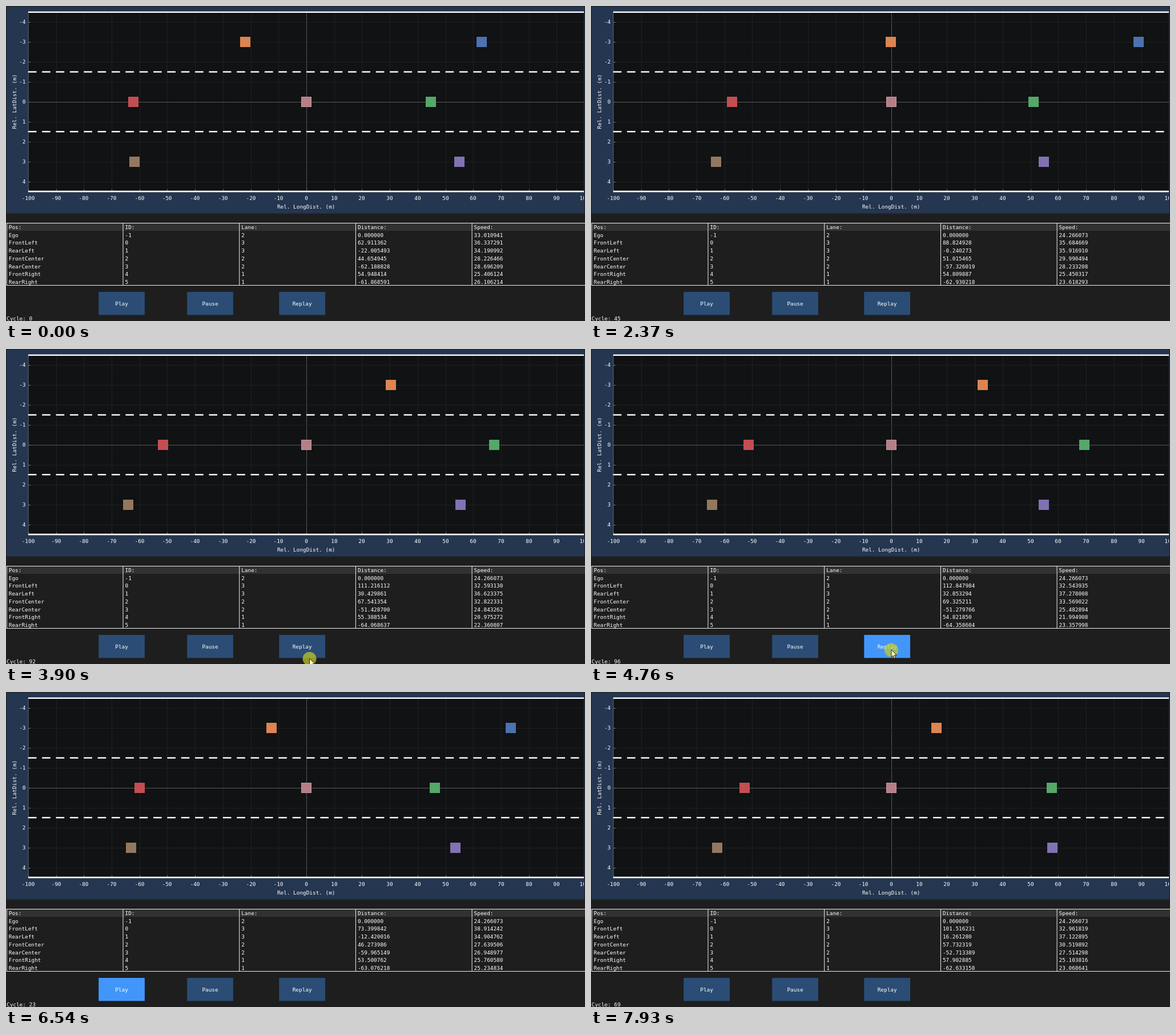
Write an HTML page with a canvas that moves like this. It is 1014 px wide and 552 px high and loops after 8 s.

```html
<!DOCTYPE html>
<html lang="en">
<head>
<meta charset="utf-8">
<title>Lane traffic view</title>
<style>
html, body { margin: 0; width: 100%; height: 100%; overflow: hidden; background: #1e1e1e; }
canvas { display: block; }
</style>
</head>
<body>
<canvas id="stage" width="1014" height="552"></canvas>
<script>
const g = document.getElementById('stage').getContext('2d');
const LOOP = 8000, FRAME = 66.1, DT = 0.05;
const X0 = 526, Y0 = 168, SX = 4.872, SY = 34.9;
const LEFT = 39, TOP = 10, RIGHT = 1012, BOTTOM = 326;
const COLUMN = 203.7, ROW = 13.72;

// Distances at a few cycles; everything between is a smooth curve
const KNOTS = [0, 19, 45, 71, 96];
const CARS = [
  ['FrontLeft', 3, '#4c72b0', [62.911362, 70.734703, 88.824928, 102.461967, 112.847984]],
  ['RearLeft', 3, '#dd8452', [-22.005493, -14.5777, -0.240273, 17.579369, 32.853294]],
  ['FrontCenter', 2, '#55a868', [44.654945, 45.464451, 51.015465, 58.433643, 69.325211]],
  ['RearCenter', 2, '#c44e52', [-62.188828, -60.581547, -57.326019, -52.451466, -51.279766]],
  ['FrontRight', 1, '#8172b3', [54.948414, 53.27779, 54.809887, 57.943314, 54.82185]],
  ['RearRight', 1, '#937860', [-61.868591, -63.20158, -62.930218, -62.67807, -64.358604]]
].map(([name, lane, color, dist]) =>
  ({ name, lane, color, road: dist.map((d, i) => d + egoTravel(KNOTS[i])) }));

// [time in ms, cycle counter]
const CLOCK = [[930, 0], [1586, 19], [2380, 45], [3239, 71], [4040, 96],
  [4820, 96], [4821, 0], [5800, 0], [6544, 23], [7932, 69]];
// Pointer visits: [time, x, y]
const VISITS = [
  [[320, 352, 562], [600, 206, 534], [850, 206, 536], [1000, 208, 568]],
  [[3500, 540, 566], [4160, 526, 527], [4820, 526, 527], [5090, 206, 534],
   [5480, 206, 534], [5740, 206, 537], [5900, 208, 568]]
];
const PRESSES = [[640, 720], [4490, 4700], [5410, 5560]];
const HELD_HOVER = [[850, 2040], [5740, 7000]];
const BUTTONS = [['Play', 162.2], ['Pause', 317.2], ['Replay', 478.3]];

// The ego car brakes steadily, then cruises
function egoSpeed(c) {
  return 24.266073 + 8.744868 * Math.max(0, 1 - c / 13);
}
function egoTravel(c) {
  const b = Math.min(c, 13);
  return DT * (24.266073 * c + 8.744868 * (b - b * b / 26));
}

const within = (t, spans) => spans.some(([a, b]) => t >= a && t < b);
const noise = n => (Math.abs(Math.sin(n * 12.9898) * 43758.5453) % 1) - 0.5;

function lerpKeys(keys, t, k = 1) {
  if (t <= keys[0][0]) return keys[0][k];
  const i = keys.findIndex(p => p[0] >= t);
  if (i < 0) return keys[keys.length - 1][k];
  const a = keys[i - 1], b = keys[i];
  return a[k] + (b[k] - a[k]) * (t - a[0]) / (b[0] - a[0]);
}

// Catmull-Rom curve of the position along the road
function roadAt(road, c) {
  const last = KNOTS.length - 1;
  const slope = j => {
    const a = Math.max(0, j - 1), b = Math.min(last, j + 1);
    return (road[b] - road[a]) / (KNOTS[b] - KNOTS[a]);
  };
  let i = 1;
  while (i < last && c > KNOTS[i]) i++;
  const n = KNOTS[i] - KNOTS[i - 1], u = (c - KNOTS[i - 1]) / n;
  return road[i - 1] + (road[i] - road[i - 1]) * u * u * (3 - 2 * u)
    + n * u * (1 - u) * (slope(i - 1) * (1 - u) - slope(i) * u);
}

function carState({ road }, i, c) {
  return {
    dist: roadAt(road, c) - egoTravel(c),
    speed: (roadAt(road, c + 0.5) - roadAt(road, c - 0.5)) / DT + 2 * noise(c * 7 + i + 1)
  };
}

function rect(x, y, w, h, color) {
  g.fillStyle = color;
  g.fillRect(x, y, w, h);
}

function text(s, x, y, align = 'left') {
  g.fillStyle = '#fff';
  g.textAlign = align;
  g.fillText(s, x, y + 3.4);
}

function drawPlot(states) {
  const width = RIGHT - LEFT, height = BOTTOM - TOP;
  const gridColor = m => m ? '#1e2022' : '#57585a';
  rect(1, 1, 1012, 362.5, '#243650');
  rect(LEFT, TOP, width, height, '#101213');
  g.save();
  g.beginPath();
  g.rect(0, 0, RIGHT, 363);
  g.clip();
  for (let m = -100; m <= 100; m += 10) {
    const x = Math.round(X0 + m * SX);
    rect(x, TOP, 1, height, gridColor(m));
    rect(x, BOTTOM - 5, 1, 4, '#777');
    text(String(m), x, 336.7, 'center');
  }
  for (let m = -4; m <= 4; m++) {
    const y = Math.round(Y0 + m * SY);
    rect(LEFT, y, width, 1, gridColor(m));
    rect(LEFT, y, 4, 1, '#777');
    text(String(m), 34.5, y, 'right');
  }
  rect(LEFT - 0.5, TOP, 1, height, '#5c6370');
  rect(LEFT, BOTTOM, width, 1, '#5c6370');

  // Road edges are solid, lane borders dashed
  for (const side of [-1, 1]) {
    rect(LEFT, Y0 + side * 4.5 * SY - 1.4, width, 2.4, '#fff');
    for (let m = -100; m < 100; m += 5)
      rect(X0 + m * SX, Y0 + side * 1.5 * SY - 1.4, 3 * SX, 2.4, '#fff');
  }

  g.beginPath();
  g.rect(LEFT, TOP, width, height);
  g.clip();
  CARS.forEach((car, i) => rect(Math.round(X0 + states[i].dist * SX - 9),
    Math.round(Y0 + (2 - car.lane) * 3 * SY - 9), 18, 18, car.color));
  rect(X0 - 9, Y0 - 9, 18, 18, '#cb93a6');
  rect(X0 - 8, Y0 - 8, 16, 16, '#b57f85');
  g.restore();

  text('Rel. LongDist. (m)', 525.7, 351.2, 'center');
  g.save();
  g.translate(15, 167.5);
  g.rotate(-Math.PI / 2);
  text('Rel. LatDist. (m)', 0, 0, 'center');
  g.restore();
}

function drawTable(c, states) {
  rect(1, 380, 1013, 14, '#303133');
  for (let k = 0; k < 5; k++) rect(0.8 + k * COLUMN, 380, 1, 110, '#f2f2f2');
  for (const y of [380, 489]) rect(1, y, 1013, 1, '#f2f2f2');
  const rows = [
    ['Pos:', 'ID:', 'Lane:', 'Distance:', 'Speed:'],
    ['Ego', -1, 2, '0.000000', egoSpeed(c).toFixed(6)],
    ...CARS.map((car, i) =>
      [car.name, i, car.lane, states[i].dist.toFixed(6), states[i].speed.toFixed(6)])
  ];
  rows.forEach((row, r) =>
    row.forEach((cell, k) => text(String(cell), 4.8 + k * COLUMN, 387.6 + r * ROW)));
}

function drawButtons(t, pointer) {
  const w = 80.7, h = 40.4, y = 501;
  for (const [label, x] of BUTTONS) {
    const over = pointer && pointer.x >= x && pointer.x < x + w && pointer.y > y && pointer.y < y + h;
    const hover = over || (label === 'Play' && within(t, HELD_HOVER));
    const color = over && within(t, PRESSES) ? '#0f87fa' : hover ? '#4296fa' : '#2b4d75';
    rect(x, y, w, h, color);
    text(label, x + w / 2, 521.3, 'center');
  }
}

function drawPointer({ x, y }) {
  g.fillStyle = 'rgba(200, 205, 40, 0.7)';
  g.beginPath();
  g.arc(x, y + 0.5, 12, 0, 7);
  g.fill();
  const arrow = [[0, 0], [0, 13], [3, 10.3], [5.2, 15.2], [7.4, 14.2], [5.3, 9.4], [9.3, 9.2]];
  g.beginPath();
  arrow.forEach(([dx, dy]) => g.lineTo(x + dx, y + dy));
  g.closePath();
  g.fillStyle = '#fff6b8';
  g.strokeStyle = '#222';
  g.lineWidth = 1;
  g.fill();
  g.stroke();
}

function draw(now) {
  const t = Math.floor((now % LOOP + 10) / FRAME) * FRAME;
  const c = Math.round(lerpKeys(CLOCK, t));
  const states = CARS.map((car, i) => carState(car, i, c));
  const path = VISITS.find(v => t >= v[0][0] && t < v[v.length - 1][0]);
  const pointer = path && { x: lerpKeys(path, t, 1), y: lerpKeys(path, t, 2) };

  g.font = '9.38px "DejaVu Sans Mono", monospace';
  rect(0, 0, 1014, 552, '#1e1e1e');
  drawPlot(states);
  drawTable(c, states);
  drawButtons(t, pointer);
  text('Cycle: ' + c, 1, 547.2);
  if (pointer) drawPointer(pointer);
}

const start = performance.now();
function tick() {
  draw(performance.now() - start);
  requestAnimationFrame(tick);
}
tick();
</script>
</body>
</html>
```
